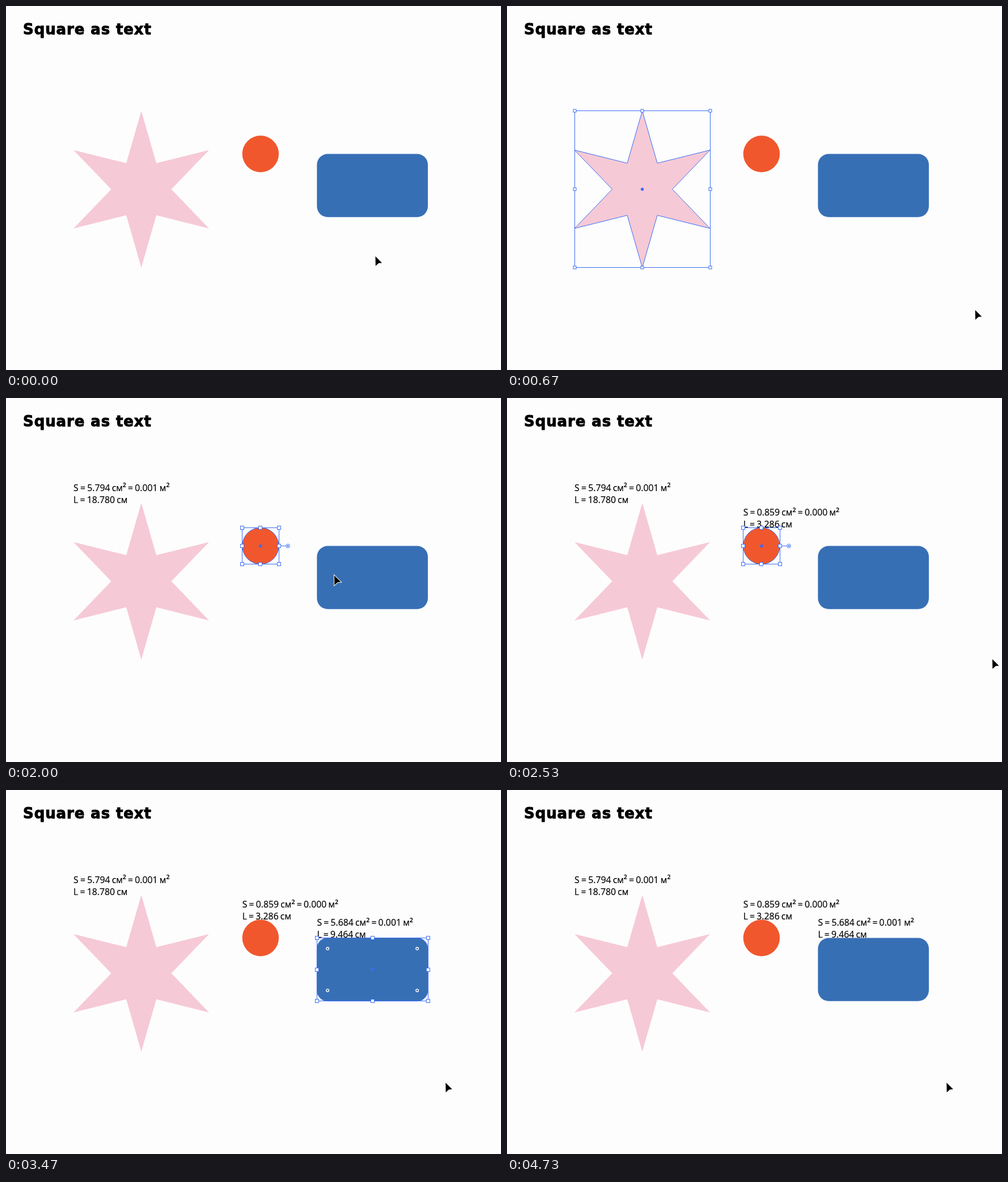
Animation of 873x641 px, one loop 4.8 s. Source, as an HTML page:

```html
<!DOCTYPE html>
<html lang="en">
<head>
<meta charset="utf-8">
<title>Square as text</title>
<style>
  html, body { margin: 0; width: 100%; height: 100%; overflow: hidden; background: #fdfdfd; }
  svg { display: block; width: 873px; height: 641px; }
  .title {
    font: bold 26px "DejaVu Sans", Verdana, sans-serif;
    letter-spacing: .9px; stroke: #000; stroke-width: 1px;
  }
  .label {
    font: 15.8px "Open Sans", "Noto Sans", sans-serif;
    word-spacing: -.9px; stroke: #000; stroke-width: .2px;
  }
  .sup { font-size: 10.5px; font-weight: 600; }
  .line { fill: none; stroke: #3b6df5; }
  .handle { fill: #fff; stroke: #3b6df5; }
  .dot { fill: #3b6df5; }
  .corner { fill: #376fb5; stroke: #fff; stroke-width: 1.4; }
</style>
</head>
<body>
<svg id="stage" viewBox="0 0 873 641"></svg>
<script>
const LOOP = 4800, FPS = 15, LAST = 72;
const stage = document.getElementById('stage');

function add(parent, tag, attrs, text) {
  const el = document.createElementNS('http://www.w3.org/2000/svg', tag);
  for (const name in attrs) el.setAttribute(name, attrs[name]);
  if (text) el.textContent = text;
  return parent.appendChild(el);
}

function star(cx, cy, outer, inner) {
  const points = Array.from({ length: 12 }, (_, i) => {
    const r = i % 2 ? inner : outer, a = (i / 6 - .5) * Math.PI;
    return [cx + r * Math.cos(a), cy + r * Math.sin(a)];
  });
  return ['polygon', { points: points.join(' ') }];
}

// Times are steps, 15 per second. Each path is the cursor's way: [step, x, y].
const items = [
  {
    shape: star(238.6, 322.7, 138, 53), fill: '#f6c9d6', size: 5,
    area: '5.794', metres: '0.001', length: '18.780',
    click: 5, measure: 22, leave: 28, hide: 14,
    path: [[0, 651.5, 440.8], [5, 296, 330], [10, 825.7, 535.5]]
  },
  {
    shape: ['circle', { cx: 448.9, cy: 260.5, r: 32.2 }], fill: '#f1572d', size: 6,
    area: '0.859', metres: '0.000', length: '3.286',
    click: 28, measure: 37, leave: 43, hide: 32,
    path: [[25, 583, 440], [28, 452, 262], [30, 579, 312.5]]
  },
  {
    shape: ['rect', { x: 548.4, y: 260.5, width: 195.6, height: 111.2, rx: 19 }], fill: '#376fb5', size: 6,
    area: '5.684', metres: '0.001', length: '9.464',
    click: 43, measure: 52, leave: 70, hide: LAST,
    path: [[38, 856, 460], [43, 651.5, 303], [47, 818, 527], [49, 775.3, 515.5]]
  }
];

const parts = [];
function timed(from, to) {
  const el = add(stage, 'g', {});
  parts.push({ el, from, to });
  return el;
}

function label({ box, area, metres, length, measure }) {
  const g = timed(measure, LAST);
  const x = box.x, y = box.y - 21.2;
  const row = add(g, 'text', { x, y, class: 'label' });
  const sup = () => add(row, 'tspan', { dy: -6.5, class: 'sup' }, '2');
  add(row, 'tspan', {}, `S = ${area} см`);
  sup();
  add(row, 'tspan', { dy: 6.5 }, ` = ${metres} м`);
  sup();
  add(g, 'text', { x, y: y + 21, class: 'label' }, `L = ${length} см`);
}

const dot = (g, cx, cy, r) => add(g, 'circle', { cx, cy, r, class: 'dot' });
const crisp = v => Math.floor(v) + .5;

function outline({ shape: [tag, geo], box }, from, to) {
  const g = timed(from, to);
  add(g, tag, { ...geo, class: 'line' });
  dot(g, box.x + box.width / 2, box.y + box.height / 2, 2.7);
  return g;
}

function selection(item) {
  const { box, size, click, leave } = item;
  const g = outline(item, click, leave);
  const xs = [0, .5, 1].map(u => crisp(box.x + box.width * u));
  const ys = [0, .5, 1].map(u => crisp(box.y + box.height * u));
  add(g, 'rect', { x: xs[0], y: ys[0], width: xs[2] - xs[0], height: ys[2] - ys[0], class: 'line' });
  for (const x of xs) for (const y of ys) {
    if (x === xs[1] && y === ys[1]) continue;
    add(g, 'rect', { x: x - size / 2, y: y - size / 2, width: size, height: size, class: 'handle' });
  }
  return g;
}

function pieKnob(g, { x, y, width, height }) {
  const cx = x + width + 16, cy = y + height / 2;
  add(g, 'path', { d: `M${cx - 13} ${cy}h9.5`, class: 'line' });
  add(g, 'circle', { cx, cy, r: 3.3, class: 'handle' });
  dot(g, cx, cy, 1.5);
}

function cornerKnobs(g, { x, y, width, height }, inset) {
  for (const cx of [x + inset, x + width - inset])
    for (const cy of [y + inset, y + height - inset])
      add(g, 'circle', { cx, cy, r: 2.3, class: 'corner' });
}

add(stage, 'text', { x: 30, y: 50, class: 'title' }, 'Square as text');
for (const item of items) {
  const [tag, geo] = item.shape;
  item.box = add(stage, tag, { ...geo, fill: item.fill }).getBBox();
}
items.forEach(label);
for (const item of items) outline(item, item.click - 3, item.click);
const [, circleBox, rectBox] = items.map(selection);
pieKnob(circleBox, items[1].box);
cornerKnobs(rectBox, items[2].box, 18.8);

const cursor = add(stage, 'path', {
  d: 'M0 0L11.6 11.6L5.8 12L.3 17Z', stroke: '#fdfdfd', 'stroke-width': 2, 'paint-order': 'stroke'
});

const easeOut = u => 1 - (1 - u) ** 2;

function cursorAt(k) {
  const trip = items.find(({ path, hide }) => k >= path[0][0] && k < hide);
  if (!trip) return null;
  const i = trip.path.findIndex(p => p[0] > k);
  if (i < 0) return trip.path.at(-1).slice(1);
  const [k0, x0, y0] = trip.path[i - 1], [k1, x1, y1] = trip.path[i];
  const u = easeOut((k - k0) / (k1 - k0));
  return [x0 + (x1 - x0) * u, y0 + (y1 - y0) * u];
}

function draw(ms) {
  // The small lead absorbs step times rounded to 10 ms.
  const k = Math.floor((ms % LOOP + 4) * FPS / 1000) % LAST;
  for (const { el, from, to } of parts)
    el.style.display = k >= from && k < to ? '' : 'none';
  const pos = cursorAt(k);
  cursor.style.display = pos ? '' : 'none';
  if (pos) cursor.setAttribute('transform', `translate(${pos})`);
}

const start = performance.now();
function tick() {
  draw(performance.now() - start);
  requestAnimationFrame(tick);
}
tick();
</script>
</body>
</html>
```
